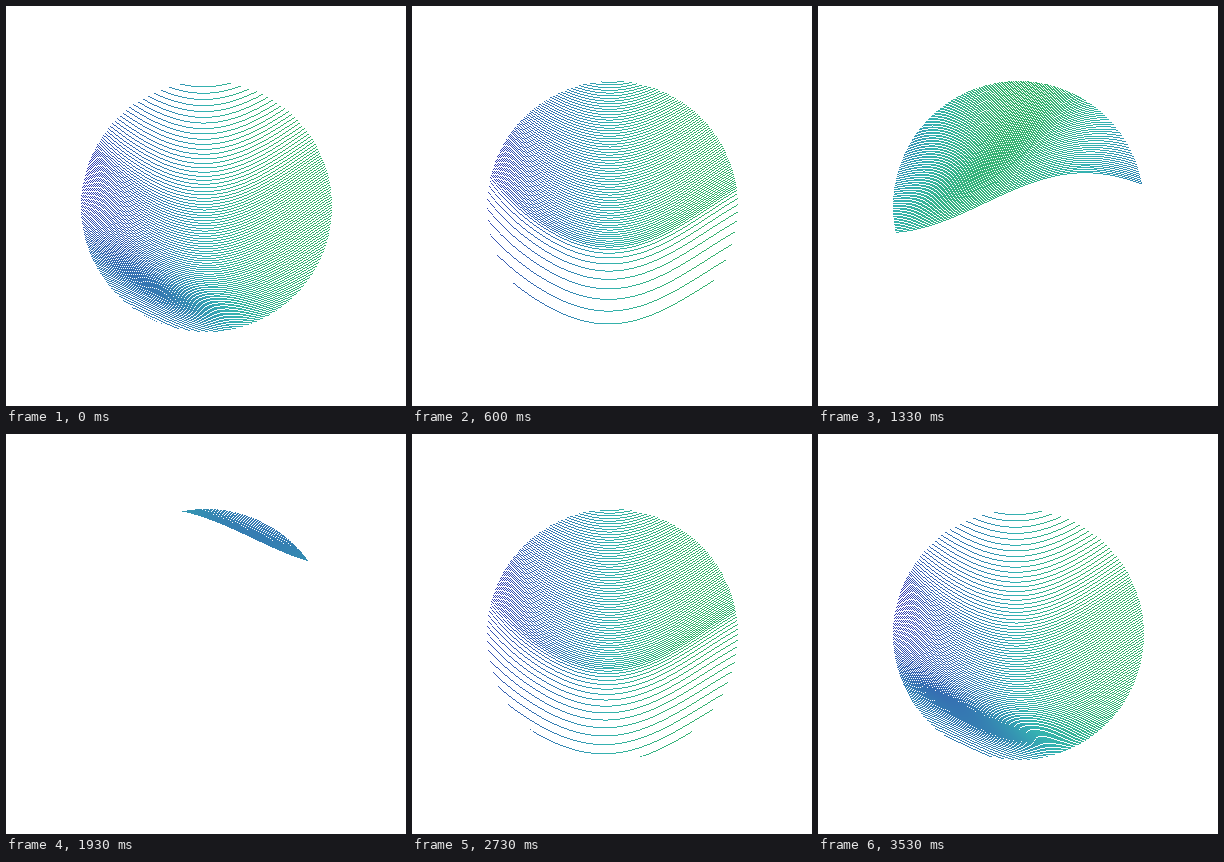
Write a matplotlib script that moves like this. It is 400 px wide and 400 px high and loops after 3.59 s.

```python
import numpy as np
import matplotlib.pyplot as plt
from matplotlib.animation import FuncAnimation
from matplotlib.colors import hsv_to_rgb

SIZE, DPI = 400, 100
LOOP, TICK = 3590, 10            # ms
STEP = 200 / 3                   # ms between picture changes
PERIOD = 53.5                    # steps of one rise and fall
CENTER, RADIUS = 200, 125.5
WAVELENGTH = 400

x = np.arange(75, 326)
line = np.arange(121)[:, None]   # counted from the lowest line up


def ease(u, start, end):
    s = np.clip((u - start) / (end - start), 0, 1)
    return (1 - np.cos(np.pi * s)) / 2


def bump(middle, width):
    return np.exp(-((line - middle) / width) ** 2)


def heights(u):
    """Height of every line's valley, u steps after the lowest pose."""
    edge = 338 - 68 * ease(u, 0, 15) - 200 * ease(u, 17, 28.3)
    gap = 2.7 - 2.2 * ease(u, 17, 24)
    puff = 55 + 41 * ease(u, 0, 15.5) - 96 * ease(u, 14.5, 19)
    # Lowest lines fall away and return; the top ones start spread out
    drop = 0.7 * np.sin(np.pi * min(u / 15.5, 1)) ** 2
    crest = 0.07 * (1 - ease(u, 0, 9))
    return (edge - gap * line + puff * (1 - bump(0, 30))
            + drop * np.maximum(46 - line, 0) ** 2
            - crest * np.maximum(line - 70, 0) ** 2)


def curves(u):
    low = bump(0, 30)
    lean = 44 - 66 * ease(u, 0, 14) - 22 * ease(u, 14, 18)
    valley = 197 - 215 * ease(u, 17, 25) + lean * low
    swing = 43 - 13 * low
    wave = swing * (1 - np.cos(2 * np.pi * (x - valley) / WAVELENGTH))
    curl = 28 * (1 - ease(u, 17, 22)) * bump(58, 25) * np.exp((75 - x) / 25)
    return heights(u) - wave - curl


def picture(step):
    u = (step + 0.5) % PERIOD
    y = curves(min(u, PERIOD - u))

    # The slope sets the hue: falling is blue, level teal, rising green
    angle = np.arctan(np.gradient(y, axis=1))
    hue = 0.5 + angle / (2 * np.pi)
    tone = np.full_like(hue, 0.7)
    color = hsv_to_rgb(np.stack([hue, tone, tone], axis=-1))

    row = np.rint(y).astype(int)
    column = np.broadcast_to(x, row.shape)
    inside = (column - CENTER) ** 2 + (row - CENTER) ** 2 < RADIUS ** 2
    canvas = np.ones((SIZE, SIZE, 3))
    canvas[row[inside], column[inside]] = color[inside]
    return canvas


fig = plt.figure(figsize=(SIZE / DPI, SIZE / DPI), dpi=DPI, facecolor="white")
ax = fig.add_axes([0, 0, 1, 1])
ax.axis("off")
image = ax.imshow(picture(0), interpolation="nearest", aspect="auto")


def update(tick):
    step = int((tick * TICK + 5) / STEP)
    image.set_data(picture(step))
    return [image]


anim = FuncAnimation(fig, update, frames=LOOP // TICK, interval=TICK,
                     repeat=True, repeat_delay=0)
plt.show()
```
